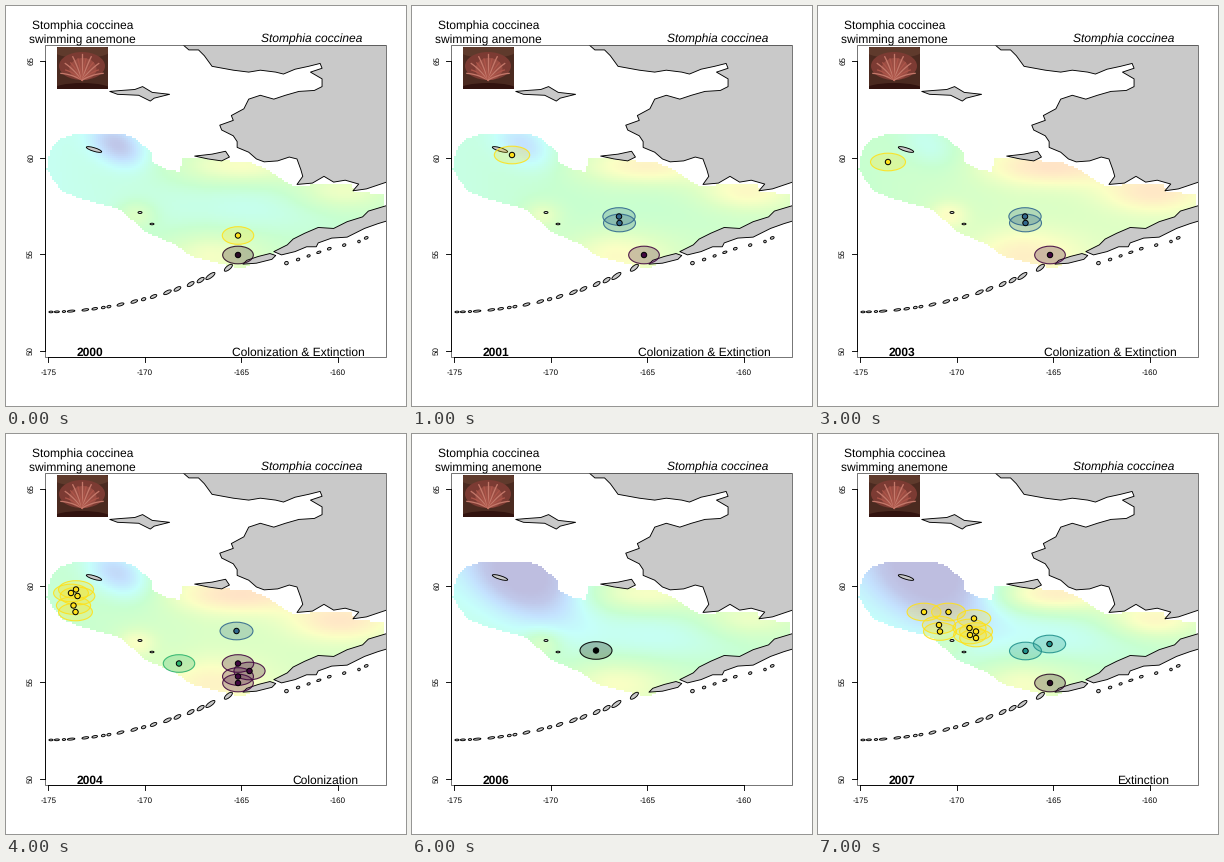
A matplotlib script that plays this animation: 400x400 px, repeating every 8 s.

```python
import math
import random

import matplotlib.pyplot as plt
import numpy as np
from matplotlib.animation import FuncAnimation
from matplotlib.colors import LinearSegmentedColormap
from matplotlib.patches import Ellipse, Polygon, Rectangle
from matplotlib.path import Path

SIZE = 400
PT = 0.72  # points per pixel at 100 dpi
CELL = 2
DEG = 19.3  # pixels per degree

plt.rcParams["font.family"] = "Liberation Sans"
plt.rcParams["text.hinting"] = "none"

fig = plt.figure(figsize=(4, 4), dpi=100, facecolor="white")
ax = fig.add_axes([0, 0, 1, 1])
ax.set_xlim(0, SIZE)
ax.set_ylim(SIZE, 0)
ax.axis("off")


def project(lon, lat):
    return 42 + DEG * (lon + 175), 152 + DEG * (60 - lat)


def label(x, y, text, size=12, **kw):
    opts = dict(ha="center", va="baseline", zorder=9)
    opts.update(kw)
    return ax.text(x, y, text, fontsize=size * PT, **opts)


def line(xs, ys, color="black", width=0.9, **kw):
    ax.plot(xs, ys, color=color, lw=width * PT, **kw)


# --- land, as longitude and latitude ----------------------------------------

MAINLAND = [
    (-168, 65.86), (-167.7, 65.6), (-167.2, 65.6), (-166.9, 65.3),
    (-166.5, 64.75), (-165.4, 64.55), (-164.6, 64.45), (-164, 64.55),
    (-163.2, 64.45), (-162.8, 64.35), (-162.2, 64.6), (-161.5, 64.75),
    (-160.9, 64.9), (-160.8, 64.65), (-161.4, 64.45), (-160.8, 64.1),
    (-160.8, 63.7), (-161.2, 63.5), (-162, 63.45), (-162.7, 63.25),
    (-163.3, 63.05), (-164, 63.25), (-164.6, 63.05), (-164.85, 62.55),
    (-165.5, 62.2), (-165.4, 61.95), (-166.1, 61.7), (-166, 61.45),
    (-165.4, 61.15), (-165.2, 60.85), (-165.2, 60.55), (-164.6, 60.3),
    (-164.2, 59.95), (-163.8, 59.8), (-163.1, 59.85), (-162.5, 60.05),
    (-162.1, 59.95), (-161.9, 59.4), (-161.8, 59.05), (-162.1, 58.63),
    (-161.3, 58.7), (-160.7, 59.05), (-160.2, 58.75), (-159.6, 58.85),
    (-158.9, 58.65), (-159.2, 58.3), (-158.5, 58.4), (-157.4, 58.77),
    (-157.4, 65.86),
]
PENINSULA = [
    (-157.4, 57.55), (-158.4, 57.25), (-158.7, 56.95), (-159.5, 56.7),
    (-160.2, 56.35), (-161, 56.4), (-161.7, 56.1), (-162.3, 55.8),
    (-162.6, 55.5), (-163.3, 55.15), (-162.9, 54.98), (-162.2, 55.15),
    (-161.6, 55.4), (-161.1, 55.4), (-161, 55.6), (-160.3, 55.85),
    (-159.5, 55.9), (-158.6, 56.35), (-157.9, 56.6), (-157.4, 56.75),
]
UNIMAK = [
    (-164.9, 54.5), (-164.7, 54.7), (-164.1, 54.9), (-163.5, 55.05),
    (-163.2, 54.95), (-163.4, 54.75), (-164.2, 54.55),
]
NUNIVAK = [
    (-167.4, 60.1), (-166.5, 60.2), (-165.8, 60.35), (-165.6, 60.05),
    (-166, 59.85), (-166.7, 59.95),
]
ST_LAWRENCE = [
    (-171.8, 63.45), (-171.2, 63.5), (-170.5, 63.55), (-170.1, 63.7),
    (-169.6, 63.4), (-168.7, 63.3), (-169.5, 63.1), (-169.7, 62.95),
    (-170.3, 63.25), (-171.4, 63.3),
]
LAND_STYLE = dict(facecolor="#c9c9c9", edgecolor="black", lw=0.9 * PT, zorder=2)


def draw_islet(x, y, w, h, tilt):
    ax.add_patch(Ellipse((x, y), w, h, angle=tilt, **LAND_STYLE))


def draw_land():
    frame = Rectangle((38.5, 38.5), 341, 312, transform=ax.transData)
    for coast in [MAINLAND, PENINSULA, UNIMAK, NUNIVAK, ST_LAWRENCE]:
        shape = [project(*p) for p in coast]
        patch = ax.add_patch(Polygon(shape, joinstyle="round", **LAND_STYLE))
        patch.set_clip_path(frame)

    draw_islet(88, 143.5, 16, 3.5, 17)
    draw_islet(134, 206.5, 4, 2, 0)
    draw_islet(146, 218, 4, 1.6, 0)

    # the island arc grows towards the peninsula
    rng = random.Random(4)
    x = 45
    while x < 228:
        u = (x - 39) / 189
        length = 5 + 10 * max(0, u - 0.55) + rng.uniform(-2, 3)
        tilt = -math.degrees(math.atan(0.5 * u)) - 14 * u
        draw_islet(x, 306 - 47 * u * u, length, 1.6 + 2.4 * u, tilt)
        x += length + rng.uniform(1, 8)
    for x in range(278, 365, 12):
        draw_islet(x + rng.uniform(-3, 3), 258 - 0.3 * (x - 275),
                   rng.uniform(2, 5), rng.uniform(2, 3.5), -20)


def draw_axes():
    ax.add_patch(Rectangle((38.5, 38.5), 341, 312, fill=False, lw=0.8 * PT,
                           edgecolor="#555555", zorder=4))
    line([42, 331.5], [350.5, 350.5], zorder=4)
    line([38.5, 38.5], [55, 344.5], zorder=4)
    for k in range(4):
        x = 42 + 96.5 * k
        y = 55 + 96.5 * k
        line([x, x], [350.5, 355.5], zorder=4)
        line([33.5, 38.5], [y, y], zorder=4)
        label(x + 0.5, 369, str(-175 + 5 * k), 8)
        label(25, y - 0.2, str(65 - 5 * k), 8, rotation=90, va="center")


def draw_photo():
    box = ax.add_patch(Rectangle((51, 41), 51, 42, facecolor="#4b2a20", zorder=5))
    blobs = [(76, 45, 56, 14, "#5f3a2c"), (76, 60, 46, 28, "#7c3b33"),
             (77, 63, 27, 22, "#9a4c42"), (76, 84, 60, 14, "#32130f")]
    for x, y, w, h, color in blobs:
        blob = ax.add_patch(Ellipse((x, y), w, h, facecolor=color, zorder=5))
        blob.set_clip_path(box)
    s = np.linspace(0, 1, 12)
    for k in range(13):
        a = math.radians(-165 + 12.5 * k)
        reach = 0.95 - 0.15 * (k % 2)
        xs = 76 + 23 * reach * math.cos(a) * s
        ys = 74 + 27 * reach * math.sin(a) * s - 5 * s * (1 - s)
        line(xs, ys, ("#c4786a", "#ad5549")[k % 2], 1.3, zorder=5)


# --- temperature field ------------------------------------------------------

SURVEY = [
    (41, 163), (43, 150), (47, 140), (55, 133), (66, 129), (80, 127), (106, 127),
    (120, 129), (130, 133), (145, 146), (146, 156), (160, 163), (174, 166),
    (176, 153), (190, 152), (246, 157), (262, 164), (274, 172), (287, 180),
    (304, 179), (345, 178), (349, 186), (379, 188), (378, 205), (325, 226),
    (262, 249), (236, 263), (215, 258), (185, 250), (170, 239), (140, 226),
    (113, 203), (90, 197), (70, 191), (56, 185), (47, 173),
]
PALE = LinearSegmentedColormap.from_list("pale", [
    (0, "#bebee0"), (0.12, "#c0c8ea"), (0.25, "#c4e2ff"), (0.38, "#c6fffb"),
    (0.52, "#c8ffd0"), (0.63, "#dcffc6"), (0.75, "#fbffc4"), (0.85, "#ffeec6"),
    (1, "#ffd8c8"),
])
# per year: mean, coastal warming, cold depth, cold reach, mid-shelf cooling
CLIMATE = [
    (0.53, 0.22, 0.35, 20, 0.11),
    (0.57, 0.25, 0.25, 22, 0.05),
    (0.62, 0.30, 0.15, 28, 0.04),
    (0.64, 0.28, 0.15, 24, 0.02),
    (0.62, 0.30, 0.34, 24, 0.00),
    (0.66, 0.22, 0.58, 28, -0.06),
    (0.55, 0.20, 0.58, 42, 0.15),
    (0.54, 0.32, 0.60, 48, 0.14),
]

steps = np.arange(CELL / 2, SIZE, CELL)
GX, GY = np.meshgrid(steps, steps)
INSIDE = Path(SURVEY).contains_points(
    np.column_stack([GX.ravel(), GY.ravel()])).reshape(GX.shape)


def bump(x, y, along, across, tilt=0):
    c, s = math.cos(math.radians(tilt)), math.sin(math.radians(tilt))
    u = ((GX - x) * c + (GY - y) * s) / along
    v = ((GY - y) * c - (GX - x) * s) / across
    return np.exp(-(u * u + v * v) / 2)


COAST = bump(235, 160, 45, 13) + 0.9 * bump(335, 186, 35, 14)
SOUTH = 0.2 * bump(205, 250, 40, 18) + 0.18 * bump(130, 209, 14, 10)


def field(i):
    mean, coast, cold, reach, cool = CLIMATE[i]
    t = mean + 0.1 * np.minimum(0, (GX - 200) / 130) + coast * COAST + SOUTH
    t -= cold * bump(112, 139, reach, 0.65 * reach, 30)
    t -= cool * bump(245, 202, 70, 20)
    rgba = PALE(np.clip(t, 0, 1))
    rgba[..., 3] = INSIDE
    return rgba


# --- sightings per year: colour -> positions --------------------------------

YELLOW, LEAF, GREEN = "#ffe11a", "#46b950", "#2db46e"
TEAL, STEEL, INDIGO = "#21918c", "#31688e", "#34507c"
PLUM, INK, BLACK = "#41063f", "#2a0a24", "#000000"

PASS = (232, 249)  # station seen in most years
SHELF = [(207, 210.5), (207.5, 217)]

SIGHTINGS = [
    {YELLOW: [(232, 229.5)], INK: [PASS]},
    {YELLOW: [(100, 149)], STEEL: SHELF, PLUM: [PASS]},
    {YELLOW: [(99, 146), (101.5, 152.5)],
     LEAF: [(69, 177.5), (95, 184), (107, 184), (108, 190.5)],
     TEAL: [(152, 207), (158.5, 203.5)],
     INDIGO: [(184, 216.5), *SHELF, (231, 204)],
     PLUM: [PASS]},
    {YELLOW: [(70, 156)], STEEL: SHELF, PLUM: [PASS]},
    {YELLOW: [(70, 155.5), (65, 159), (71.5, 162), (67.5, 171.5), (69.5, 178)],
     GREEN: [(173, 229.5)], STEEL: [(230.5, 197)],
     PLUM: [(232, 229.5), (243.5, 237), (232, 242.5), PASS]},
    {YELLOW: [(65, 158.5), (70, 155.5)], GREEN: [(86, 139)],
     STEEL: [(103.5, 165), (130, 172), (155, 178), (140, 194.5), (151, 194.5),
             (157.5, 197), (152, 201), (149, 217)],
     PLUM: SHELF},
    {BLACK: [(184, 216.5)]},
    {YELLOW: [(106, 178), (130.5, 178), (156, 184.5), (121, 191), (122, 197.5),
              (151.5, 194), (158, 197.5), (152, 201), (158, 204)],
     TEAL: [(231.5, 210), SHELF[1]], INK: [PASS]},
]
BOTH = ("Colonization & Extinction", 292.5)
GAIN = ("Colonization", 319.5)
LOSS = ("Extinction", 325)
NONE = ("", 320)
EVENTS = [BOTH, BOTH, BOTH, BOTH, GAIN, NONE, NONE, LOSS]

# --- stage ------------------------------------------------------------------

draw_land()
draw_axes()
draw_photo()
label(76.5, 23.5, "Stomphia coccinea")
label(76, 38, "swimming anemone")
label(305.5, 37, "Stomphia coccinea", style="italic")
year = label(83.8, 350, "", weight="bold")
event = label(320, 350, "")
heat = ax.imshow(field(0), extent=(0, SIZE, SIZE, 0), interpolation="nearest",
                 zorder=1, aspect="auto")
marks = []


def add_mark(x, y, color):
    lat = 60 - (y - 152) / DEG
    width = 17.6 / math.cos(math.radians(lat))  # a circle on the ground
    shapes = [
        Ellipse((x, y), width, 17.6, facecolor=color, alpha=0.25, lw=0, zorder=6),
        Ellipse((x, y), width, 17.6, fill=False, edgecolor=color, lw=1.1 * PT,
                alpha=0.9, zorder=6),
        Ellipse((x, y), 5.4, 5.4, facecolor=color, edgecolor="black", lw=1 * PT,
                zorder=7),
    ]
    marks.extend(ax.add_patch(shape) for shape in shapes)


def draw(i):
    heat.set_data(field(i))
    year.set_text(str(2000 + i))
    text, x = EVENTS[i]
    event.set_text(text)
    event.set_x(x)
    while marks:
        marks.pop().remove()
    for color, spots in SIGHTINGS[i].items():
        for spot in spots:
            add_mark(*spot, color)
    return [heat, year, event, *marks]


anim = FuncAnimation(fig, draw, frames=8, interval=1000, repeat=True,
                     repeat_delay=0, blit=False)
plt.show()
```
